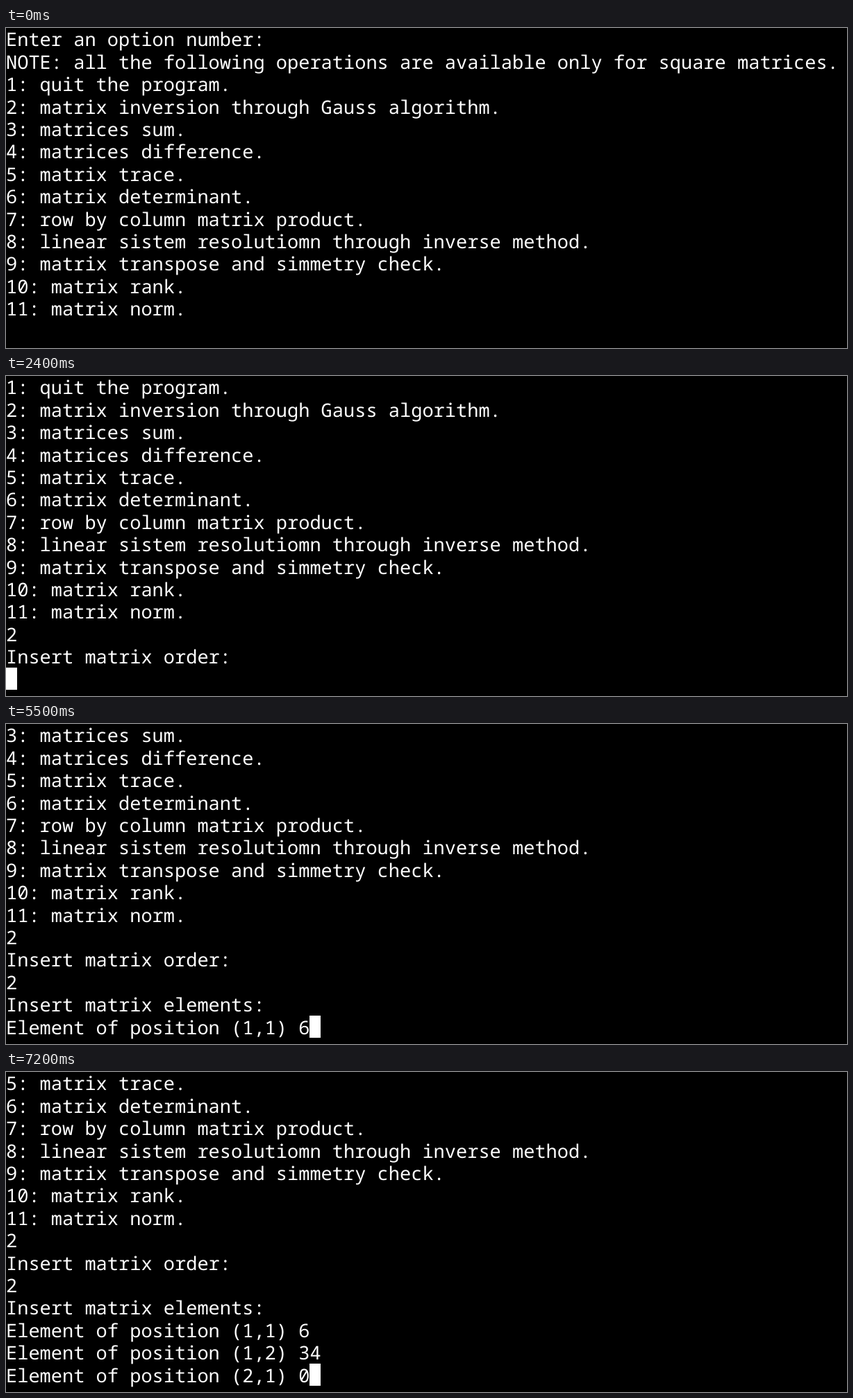
An HTML page that plays this animation: 1211x462 px, repeating every 8000 ms.

```html
<!DOCTYPE html>
<html lang="en">
<head>
<meta charset="utf-8">
<title>Matrix calculator in a terminal</title>
<style>
  html, body {
    margin: 0;
    width: 100%;
    height: 100%;
    overflow: hidden;
    background: #000;
  }
  #screen {
    position: absolute;
    left: 0;
    top: 0.4px;
    margin: 0;
    color: #fff;
    font: 450 27px/32.4px "Noto Sans Mono", "DejaVu Sans Mono", monospace;
    font-variant-ligatures: none;
    text-rendering: geometricPrecision;
  }
  #cursor {
    position: absolute;
    top: 421px;
    width: 16px;
    height: 32px;
    background: #fff;
  }
</style>
</head>
<body>
<pre id="screen"></pre>
<div id="cursor"></div>
<script>
const ROWS = 14, COLUMN = 16.2, LOOP = 8000;

const menu = `Enter an option number:
NOTE: all the following operations are available only for square matrices.
1: quit the program.
2: matrix inversion through Gauss algorithm.
3: matrices sum.
4: matrices difference.
5: matrix trace.
6: matrix determinant.
7: row by column matrix product.
8: linear sistem resolutiomn through inverse method.
9: matrix transpose and simmetry check.
10: matrix rank.
11: matrix norm.
`;

// Each step: time in ms, text added to the terminal, cursor visible.
const steps = [
  [0, menu, false],
  [800, "", true],
  [1200, "", false],
  [1800, "", true],
  [2300, "2", true],
  [2400, "\nInsert matrix order:\n", true],
  [3000, "", false],
  [3600, "2", true],
  [4400, "\nInsert matrix elements:\nElement of position (1,1) ", true],
  [4700, "", false],
  [5300, "", true],
  [5500, "6", true],
  [6000, "\nElement of position (1,2) ", true],
  [6100, "3", true],
  [6400, "4", true],
  [7000, "\nElement of position (2,1) ", true],
  [7200, "0", true],
];

const screenBox = document.getElementById("screen");
const cursor = document.getElementById("cursor");
let shown = 0;

function render(count) {
  if (count === shown) return;
  shown = count;
  const past = steps.slice(0, count);
  const lines = past.map(step => step[1]).join("").split("\n").slice(-ROWS);
  screenBox.textContent = lines.join("\n");
  cursor.style.left = lines[ROWS - 1].length * COLUMN + "px";
  cursor.hidden = !past[count - 1][2];
}

const start = performance.now();
function tick() {
  const time = (performance.now() - start) % LOOP;
  render(steps.filter(step => step[0] <= time).length);
  requestAnimationFrame(tick);
}
tick();
</script>
</body>
</html>
```
